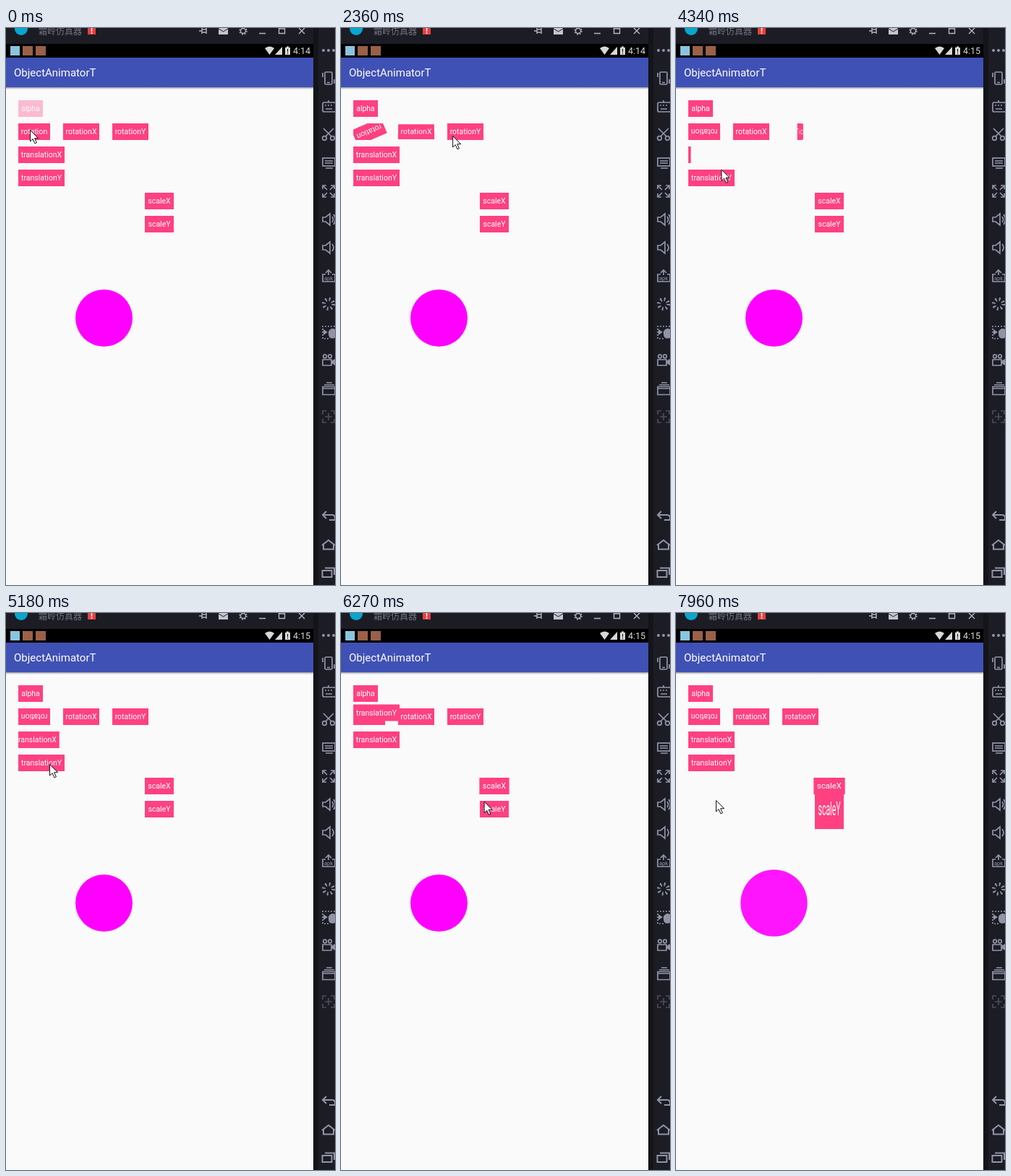
Recreate the animation shown at these times as an HTML page. Size 455 by 771 pixels, loop 8 s.

```html
<!DOCTYPE html>
<html lang="en">
<head>
<meta charset="utf-8">
<title>ObjectAnimatorT</title>
<style>
  html, body { margin: 0; width: 100%; height: 100%; overflow: hidden; background: #fafafa; }
  svg { position: absolute; left: 0; top: 0; }
  svg text { font-family: Roboto, sans-serif; }
  #content { position: absolute; left: 17px; top: 100px; width: 391px; height: 654px; overflow: hidden; }
  #row { position: absolute; left: 0; top: 32px; width: 181px; height: 23px; overflow: hidden; }
  .button {
    position: absolute; height: 23px; background: #ff4081; color: #fff;
    font: 10.5px/23px Roboto, sans-serif; text-align: center; white-space: nowrap;
  }
  #circle { position: absolute; left: 78.5px; top: 261.5px; width: 79px; height: 79px; border-radius: 50%; background: #f0f; }
</style>
</head>
<body>
<svg width="455" height="771" viewBox="0 0 455 771">
  <defs>
    <linearGradient id="shadow" x2="0" y2="1">
      <stop stop-color="#999"/><stop offset="1" stop-color="#fafafa"/>
    </linearGradient>
  </defs>
  <path fill="#1c1c25" d="M0 0h455v771h-30V22H0z"/>
  <path fill="#141419" d="M425 0h7v771h-7z"/>

  <!-- window title bar -->
  <circle cx="21" cy="1" r="9" fill="#08a6cf"/>
  <text x="45" y="8.5" font-size="12" fill="#777783" style="font-family:'Noto Sans CJK SC','Noto Sans CJK',sans-serif">霜岭仿真器</text>
  <path fill="#e93f3f" d="M113 0h11v9h-11z"/>
  <path stroke="#fff" stroke-width="1.5" d="M118.500 0v5m0 1v2"/>
  <g fill="none" stroke="#b4b4c0" stroke-width="1.4">
    <path d="M267 4h4M271 0v8M271 2h6v4h-6M277 0v8M350 7.500h9M377.500 0v7.500h8V0M377 1h9M405 0l8 8M413 0l-8 8"/>
    <circle cx="328" cy="4" r="3.500"/>
    <circle cx="328" cy="4" r="5" stroke-dasharray="1.900 2.030"/>
  </g>
  <path fill="#c4c4ce" d="M294 0h13v9h-13z"/>
  <path fill="none" stroke="#1c1c25" d="M294 1l6.500 4 6.500-4"/>

  <!-- status bar -->
  <path d="M0 22h425v19H0z"/>
  <path fill="#8ac5df" d="M6 25h13v13H6z"/>
  <path fill="#9a6048" d="M23 25h14v13H23zM41 25h14v13H41z"/>
  <g fill="#d8d8d8">
    <path d="M358 28q6.500-5 13 0l-6.500 9z"/>
    <path d="M382 26v11h-10z"/>
    <path d="M386 27h2v-1.500h3V27h2v10h-7z"/>
    <text id="clock" x="397" y="36" font-size="12.500"></text>
  </g>
  <path stroke="#000" d="M389.500 29v4m0 1v1.500"/>

  <!-- app bar -->
  <path fill="#3f51b5" d="M0 41h425v41H0z"/>
  <path fill="url(#shadow)" d="M0 82h425v3H0z"/>
  <text x="11" y="67" font-size="15" fill="#fff">ObjectAnimatorT</text>

  <!-- tool strip -->
  <g fill="none" stroke="#9294a6" stroke-width="1.700">
    <g fill="#9294a6" stroke="none">
      <circle cx="439" cy="31" r="2"/><circle cx="446" cy="31" r="2"/><circle cx="453" cy="31" r="2"/>
      <path d="M446 420q4-6 9-3v12q-9 3-9-6zM439 417l6 4-6 4zM450 461l5-3v9l-5-3z"/>
      <text x="440" y="349" font-size="7.500">apk</text>
    </g>
    <rect x="441" y="61" width="10" height="17" rx="1.500"/>
    <path d="M438 68v-6M454 71v6M444 75.500h4"/>
    <rect x="438" y="103" width="18" height="13" rx="2"/>
    <path d="M446 103v-3M441 107h2m2 0h2m2 0h2M442 112h9"/>
    <circle cx="440.500" cy="152.500" r="2.800"/><circle cx="451.500" cy="152.500" r="2.800"/>
    <path d="M439 139l11 11M453 139l-11 11"/>
    <rect x="438" y="180" width="17" height="11"/>
    <path d="M441 184h11m-11 3h11M442 194h10"/>
    <path d="M438 223v-5h5M449 218h5v5M438 229v5h5M449 234h5v-5M439 219l5 5M453 219l-5 5M439 233l5-5M453 233l-5-5"/>
    <path id="speaker" d="M438 262h4l6-5v16l-6-5h-4z"/>
    <use href="#speaker" y="39"/>
    <path d="M451 261q3 4 0 8M453 258q5 7 0 14M451 299q4 5 0 10"/>
    <path d="M442 341h-4v10h17v-10h-4M446 342v-7M442 339l4-4 4 4"/>
    <circle cx="446" cy="382" r="6.500" stroke-width="5" stroke-dasharray="1.800 3.305"/>
    <path stroke-dasharray="2 2" d="M455 413h-17v17h9"/>
    <circle cx="441" cy="454.500" r="2.300"/><circle cx="448" cy="454.500" r="2.300"/>
    <path d="M438 459h12v8h-12zM438 496.500h17v11h-17zM438 499h17M440 494h14M443 491h8"/>
    <path stroke="#4a4b55" d="M438 535v-5h5M449 530h5v5M438 541v5h5M449 546h5v-5M446 533v10M441 538h10"/>
    <path stroke-width="2" d="M443 669l-5 5 5 5M438 674h13q4 0 4 4v3h-8M437 716l9-7 9 7M439 715v6.500h14V715M437.500 751h13v9h-13zM441 747.500h13V757"/>
  </g>
</svg>

<div id="content">
  <div id="row"></div>
</div>

<svg width="455" height="771" viewBox="0 0 455 771">
  <path id="cursor" d="M.5.5v15.500l3.600-3.400 2.800 6.200 2.500-1.100-2.800-6h5z" fill="#fff" stroke="#111"/>
</svg>

<script>
const LOOP = 8000, DURATION = 2000;
const byId = id => document.getElementById(id);
const content = byId('content'), row = byId('row');

function addButton(parent, label, x, y, width) {
  const el = document.createElement('div');
  el.className = 'button';
  el.textContent = label;
  Object.assign(el.style, { left: x + 'px', top: y + 'px', width: width + 'px' });
  return parent.appendChild(el);
}

const alpha = addButton(content, 'alpha', 0, 0, 34);
const rotation = addButton(row, 'rotation', 0, 0, 44);
const rotationX = addButton(row, 'rotationX', 62, 0, 50);
const rotationY = addButton(row, 'rotationY', 130, 0, 50);
const translationX = addButton(content, 'translationX', 0, 64, 64);
const translationY = addButton(content, 'translationY', 0, 96, 64);
const scaleX = addButton(content, 'scaleX', 175, 128, 40);
const scaleY = addButton(content, 'scaleY', 175, 160, 40);
const circle = document.createElement('div');
circle.id = 'circle';
content.append(circle);

// Screen refreshes: first time, last time, count
const refreshes = [
  [0, 240, 3], [510, 1450, 8], [1600, 2600, 8], [2750, 3770, 9],
  [3920, 4890, 8], [5040, 6000, 8], [6120, 7080, 8], [7230, 7960, 6]
];

// Pointer tip: time, x, y
const pointer = [
  [0, 33, 141], [800, 33, 141], [1300, 114, 149], [1980, 114, 149],
  [2580, 186, 149], [3020, 186, 149], [3250, 141, 171], [3440, 66, 176],
  [3950, 66, 176], [4600, 60, 209], [5210, 60, 209], [5760, 198, 278],
  [6120, 204, 246], [6270, 197, 262], [6770, 197, 262], [7080, 120, 405],
  [7380, 118, 410], [7690, 118, 410], [7960, 55, 259]
];

function lastRefresh(t) {
  const [first, last, count] = refreshes.findLast(r => t >= r[0]);
  const step = (last - first) / (count - 1);
  return first + step * Math.min(count - 1, Math.floor((t - first + 16) / step));
}

// Accelerate-decelerate progress from 0 to 1
function ease(t, start, duration = DURATION) {
  const x = Math.min(1, Math.max(0, (t - start) / duration));
  return (1 - Math.cos(Math.PI * x)) / 2;
}

// There and back: 0, 1, 0
const pulse = (t, start, duration) => 1 - Math.abs(1 - 2 * ease(t, start, duration));

function pointerAt(t) {
  const i = pointer.findLastIndex(p => t >= p[0]);
  const [t0, x0, y0] = pointer[i];
  const [t1, x1, y1] = pointer[i + 1] || [LOOP, x0, y0];
  const k = (t - t0) / (t1 - t0);
  return [x0 + (x1 - x0) * k, y0 + (y1 - y0) * k];
}

function render(t) {
  alpha.style.opacity = 1 - pulse(t, -1130, 2900);
  rotation.style.transform = `rotate(${180 * ease(t, 784)}deg)`;
  rotationX.style.transform = `perspective(500px) rotateX(${360 * ease(t, 1976)}deg)`;
  rotationY.style.transform = `perspective(500px) rotateY(${360 * ease(t, 3040)}deg)`;
  translationX.style.transform = `translateX(${-75 * pulse(t, 3460)}px)`;
  translationY.style.transform = `translateY(${-75 * pulse(t, 5210)}px)`;
  scaleX.style.transform = `scaleX(${1 + 2 * pulse(t, 6145)})`;
  scaleY.style.transform = `scaleY(${1 + 2 * pulse(t, 6765)})`;

  const swell = pulse(t, 7696);
  circle.style.transform = `scale(${1 + 2 * swell})`;
  circle.style.opacity = 1 - swell;

  byId('clock').textContent = t < 3500 ? '4:14' : '4:15';
  byId('cursor').setAttribute('transform', `translate(${pointerAt(t)})`);
}

const began = performance.now();
function tick() {
  render(lastRefresh((performance.now() - began) % LOOP));
  requestAnimationFrame(tick);
}
tick();
</script>
</body>
</html>
```
